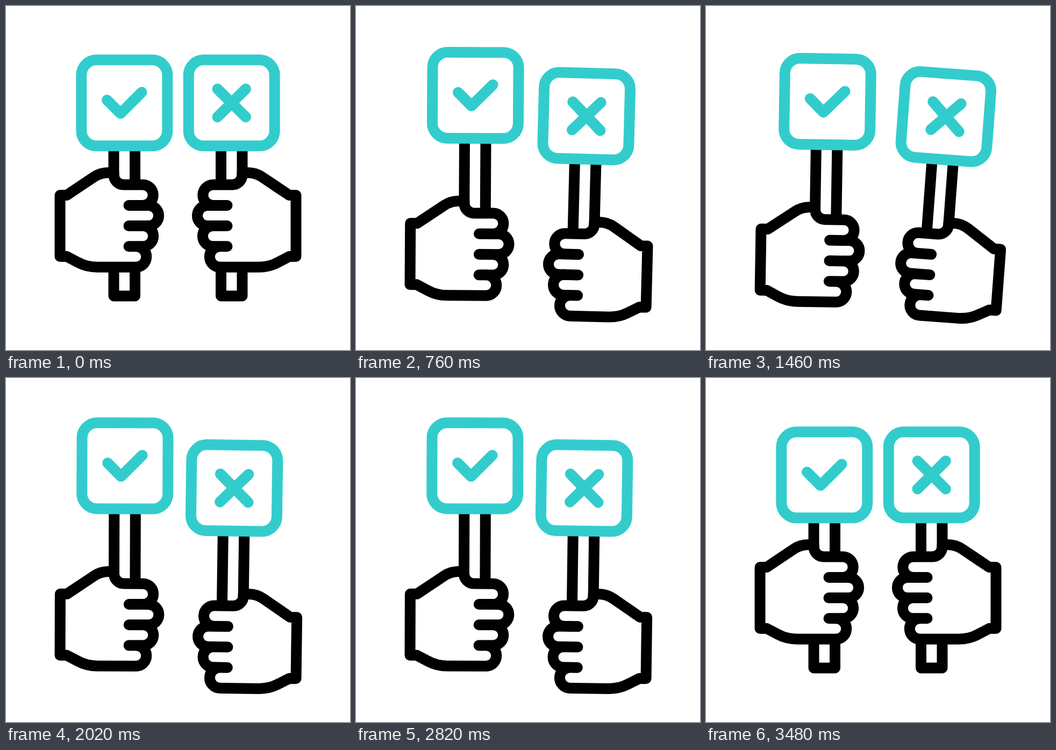
An HTML page that plays this animation: 640x640 px, repeating every 3.6 s.

```html
<!DOCTYPE html>
<html lang="en">
<head>
<meta charset="utf-8">
<title>Yes and no paddles</title>
<style>
  html, body { margin: 0; height: 100%; overflow: hidden; background: #fff; }
  svg { display: block; width: 100vw; height: 100vh; }
  path, rect { fill: #fff; stroke: #000; stroke-width: 20; stroke-linecap: round; stroke-linejoin: round; }
  .sign { stroke: #3cc; }
  .mark { stroke: #3cc; fill: none; }
</style>
</head>
<body>
<svg viewBox="0 0 640 640">
  <defs>
    <g id="paddle">
      <path d="M200.5 255V539.5H240V255"/>
      <rect class="sign" x="140.3" y="100.3" width="160" height="160" rx="28"/>
    </g>
    <path id="hand" d="M200.5 310V314A18.5 18.5 0 0 0 219 332.5
      H254.5a19.2 19.2 0 0 1 0 38.4H228.5
      H265a19.1 19.1 0 0 1 0 38.2H228.5
      H255a19.1 19.1 0 0 1 0 38.2H228.5
      H242a19.2 19.2 0 0 1 0 38.4
      H170C156 485.7 145 483 134 477L113 466H100.5V352H113L163 318.5C171 313 180 310 190.5 310Z"/>
  </defs>
  <g id="yes">
    <use href="#paddle"/>
    <path class="mark" d="M188 175L213 200L252.5 160.5"/>
    <use class="grip" href="#hand"/>
  </g>
  <g id="no">
    <g transform="translate(640) scale(-1 1)">
      <use href="#paddle"/>
      <path class="mark" d="M194 154.3L246.5 206.5M246.5 154.3L194 206.5"/>
      <use class="grip" href="#hand"/>
    </g>
  </g>
</svg>
<script>
  const LOOP = 3600;
  const times = [0, 600, 1000, 1400, 1800, 2200, 2600, 3000, 3480];
  const swing = [0, 1, -1, 1, -1, 1, -1, 1, 0];
  const lift = [0, 0, 1, 0, 1, 0, 1, 0, 0];
  const slide = [0, 1, 1, 1, 1, 1, 1, 1, 0];

  const yes = document.getElementById('yes');
  const no = document.getElementById('no');
  const grips = document.querySelectorAll('.grip');

  // Eased value of a keyframed track at time t
  function valueAt(track, t) {
    const next = times.findIndex(time => time > t);
    if (next < 0) return track[track.length - 1];
    const p = (t - times[next - 1]) / (times[next] - times[next - 1]);
    const eased = (1 - Math.cos(Math.PI * p)) / 2;
    return track[next - 1] + (track[next] - track[next - 1]) * eased;
  }

  function pose(group, dy, angle, pivotX) {
    group.setAttribute('transform', `translate(0 ${dy}) rotate(${angle} ${pivotX} 540)`);
  }

  function draw() {
    const t = performance.now() % LOOP;
    const s = valueAt(swing, t);
    const out = valueAt(slide, t);
    pose(yes, -40.4 * valueAt(lift, t), 1.02 * s, 220);
    pose(no, 24.5 * out, 4.8 * s, 420);
    grips.forEach(g => g.setAttribute('transform', `translate(0 ${67 * out})`));
    requestAnimationFrame(draw);
  }
  draw();
</script>
</body>
</html>
```
